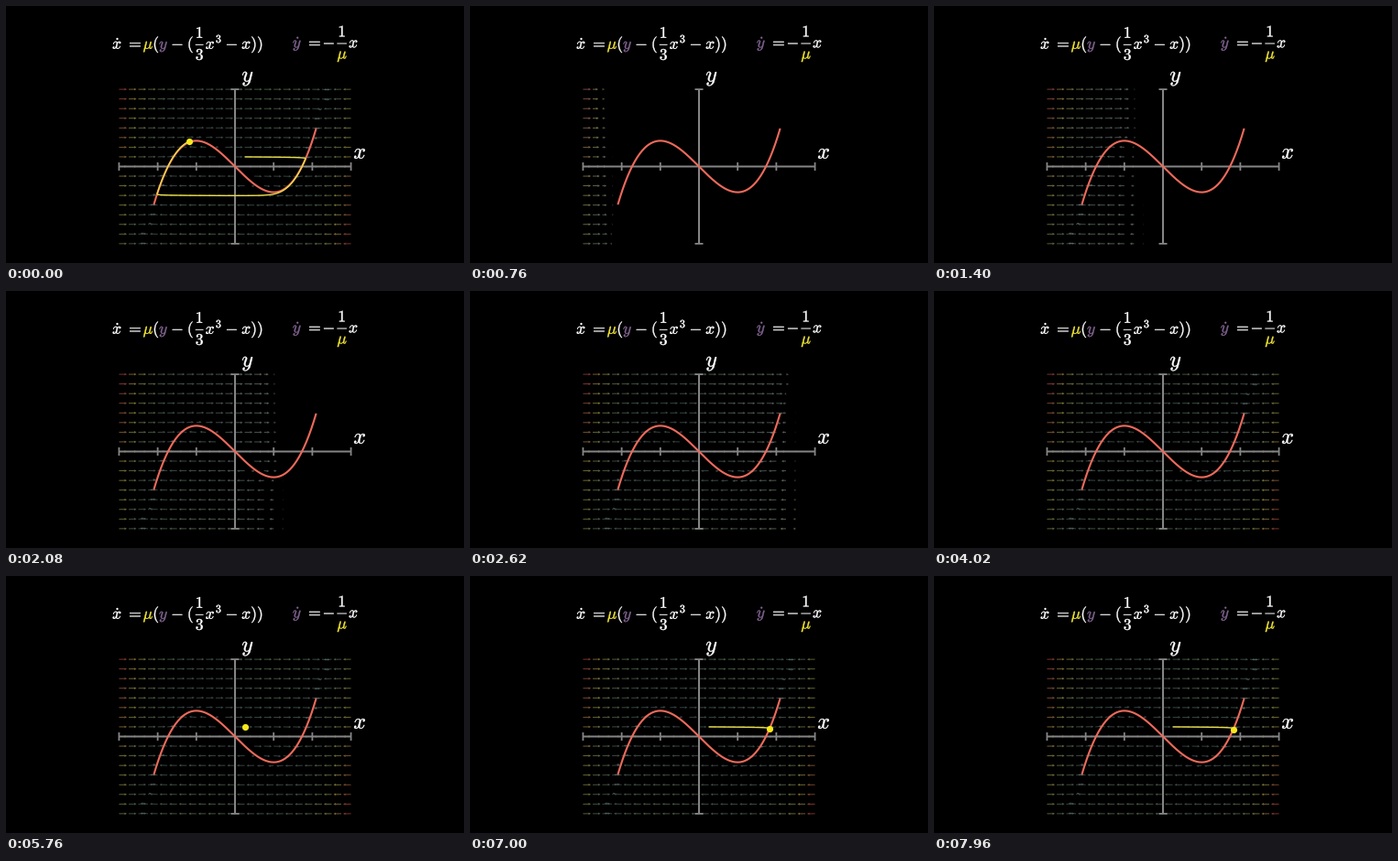
Recreate the animation shown at these times as a matplotlib script. Size 500 by 281 pixels, loop 8000 ms.

```python
import numpy as np
import matplotlib.pyplot as plt
from matplotlib.animation import FuncAnimation
from matplotlib.collections import LineCollection, PolyCollection
from matplotlib.colors import LinearSegmentedColormap
from matplotlib.patches import Circle, PathPatch
from matplotlib.textpath import TextPath
from matplotlib.transforms import Affine2D

plt.rcParams["mathtext.fontset"] = "cm"

W, H, DPI = 500, 281, 100
PT = 72 / DPI
CX, CY, UNIT = 250, 175.5, 42.2
EM = 17.6
MU, DT = 10, 0.005
INTERVAL, LOOP = 40, 8000
GREY, RED, YELLOW, PURPLE = "#858585", "#ee6a5b", "#f2e636", "#7f628f"

fig = plt.figure(figsize=(W / DPI, H / DPI), dpi=DPI, facecolor="black")
ax = fig.add_axes([0, 0, 1, 1])
ax.set(xlim=(0, W), ylim=(H, 0))
ax.axis("off")


def to_px(points):
    return np.asarray(points) * [UNIT, -UNIT] + [CX, CY]


def cubic(x):
    return x**3 / 3 - x


def flow(p):
    return np.array([MU * (p[1] - cubic(p[0])), -p[0] / MU])


def smooth(t):
    t = np.clip(t, 0, 1)
    return t * t * (3 - 2 * t)


def integrate(start):
    """Runge-Kutta orbit, up to the climb along the left branch."""
    pts = [np.array(start)]
    while len(pts) < 6000 and not (pts[-1][0] < -1 and pts[-1][1] > 0.652):
        p = pts[-1]
        k1 = flow(p)
        k2 = flow(p + DT / 2 * k1)
        k3 = flow(p + DT / 2 * k2)
        k4 = flow(p + DT * k3)
        pts.append(p + DT / 6 * (k1 + 2 * k2 + 2 * k3 + k4))
    return to_px(pts)


def line(x, y, color, width, z):
    return ax.plot(x, y, color=color, lw=width * PT, zorder=z, snap=False,
                   solid_capstyle="butt")[0]


def tex(x, base, s, color="white", size=EM):
    """Glyph outlines with their origin at (x, base), slightly emboldened."""
    path = TextPath((0, 0), f"${s}$", size=size)
    path = path.transformed(Affine2D().scale(1, -1).translate(x, base))
    ax.add_patch(PathPatch(path, fc=color, ec=color, lw=0.4 * PT, zorder=6,
                           snap=False))


def equation(x0, base, tokens):
    """Tokens are (offset in em, text, colour)."""
    for offset, s, color in tokens:
        tex(x0 + offset * EM, base, s, color)


def fraction(center, base, den, width, color):
    """Display-style 1/den with a bar on the math axis."""
    half = width * EM / 2
    tex(center - EM / 4, base - 0.677 * EM, "1")
    line([center - half, center + half], [base - EM / 4] * 2, "white", 1, 6)
    tex(center - half, base + 0.686 * EM, den, color)


def over_dot(x, base, color):
    ax.add_patch(Circle((x, base - 0.61 * EM), 1.15, color=color, lw=0,
                        zorder=6))


# Equations
x0, base = 116, 46.7
equation(x0, base, [
    (0, "x", "white"), (0.85, "=", "white"), (1.906, r"\mu", YELLOW),
    (2.509, "(", "white"), (2.898, "y", PURPLE), (3.646, "-", "white"),
    (4.646, "(", "white"), (5.775, "x^3", "white"), (7.019, "-", "white"),
    (8.019, "x", "white"), (8.591, ")", "white"), (8.98, ")", "white")])
over_dot(x0 + 0.31 * EM, base, "white")
fraction(x0 + 5.405 * EM, base, "3", 0.5, "white")

x0, base = 312.8, 45.4
equation(x0, base, [
    (0, "y", PURPLE), (0.804, "=", "white"), (1.86, "-", "white"),
    (3.481, "x", "white")])
over_dot(x0 + 0.31 * EM, base, PURPLE)
fraction(x0 + 3.06 * EM, base, r"\mu", 0.603, YELLOW)

# Axes
tex(257.3, 82.6, "y", size=24)
tex(379.3, 166.8, "x", size=24)
line([CX - 3 * UNIT, CX + 3 * UNIT], [CY, CY], GREY, 2, 3)
line([CX, CX], [CY - 2 * UNIT, CY + 2 * UNIT], GREY, 2, 3)
for k in (-3, -2, -1, 1, 2, 3):
    line([CX + k * UNIT] * 2, [CY - 4.5, CY + 4.5], GREY, 1.8, 3)
for k in (-2, 2):
    line([CX - 4.5, CX + 4.5], [CY + k * UNIT] * 2, GREY, 1.8, 3)

# Nullcline
xs = np.linspace(-2.1, 2.1, 200)
line(*to_px(np.column_stack([xs, cubic(xs)])).T, RED, 2.1, 4)

# Vector field, column by column, each column from the bottom up
gx, gy = (g.ravel() for g in np.meshgrid(np.arange(-3, 3.1, 0.25),
                                         np.arange(-2, 2.1, 0.25),
                                         indexing="ij"))
tails = to_px(np.column_stack([gx, gy]))
vec = flow((gx, gy)).T * [1, -1]
norm = np.hypot(*vec.T)
unit = vec / np.maximum(norm, 1e-9)[:, None]
normal = unit[:, ::-1] * [-1, 1]
lengths = 8.6 * np.tanh(norm)
cmap = LinearSegmentedColormap.from_list(
    "speed", ["#647c7e", "#87a57c", "#dcd55a", "#f0685a"])
colors = cmap(np.clip(norm / (8 * MU), 0, 1))
starts = 400 + np.arange(len(gx)) * 2400 / len(gx)

shafts = LineCollection([], linewidths=0.9 * PT, zorder=1, snap=False)
tips = PolyCollection([], linewidths=0, zorder=1, snap=False)
ax.add_collection(shafts)
ax.add_collection(tips)

orbit = integrate((0.25, 0.25))
trail = line([], [], "#eadd48", 1.4, 5)
dot, = ax.plot([], [], "o", color="#f7e81c", ms=7.2 * PT, mew=0, zorder=7)


def draw_field(age):
    """Arrows grow from their tails, pale at first, then take their colour."""
    grow = np.clip(age / 250, 0, 1)
    size = lengths * grow
    ends = tails + unit * size[:, None]
    back = ends - unit * np.minimum(2.6, size)[:, None]
    rgba = colors.copy()
    pale = 0.35 * (1 - smooth(age / 1300))[:, None]
    rgba[:, :3] += pale * (0.85 - rgba[:, :3])
    rgba[:, 3] = 0.55 * np.minimum(1, 2 * grow)
    shafts.set_segments(np.stack([tails, back], axis=1))
    shafts.set_color(rgba)
    tips.set_verts(np.stack([ends, back + 1.3 * normal, back - 1.3 * normal],
                            axis=1))
    tips.set_facecolor(rgba)


def update(i):
    ms = i * INTERVAL
    if ms == 0:
        draw_field(np.full(len(gx), LOOP))
        n = len(orbit) - 1
    else:
        draw_field(ms - starts)
        # fast crossing, a pause, then a slow slide down the curve
        clock = min(ms - 5760, 680) + max(ms - 7740, 0)
        n = int(round(clock / 2000 / DT)) if ms >= 5760 else -1
    trail.set_data(*orbit[:n + 1].T)
    dot.set_data(*orbit[max(n, 0):n + 1].T)
    return shafts, tips, trail, dot


anim = FuncAnimation(fig, update, frames=LOOP // INTERVAL, interval=INTERVAL,
                     repeat=True, repeat_delay=0)
plt.show()
```
